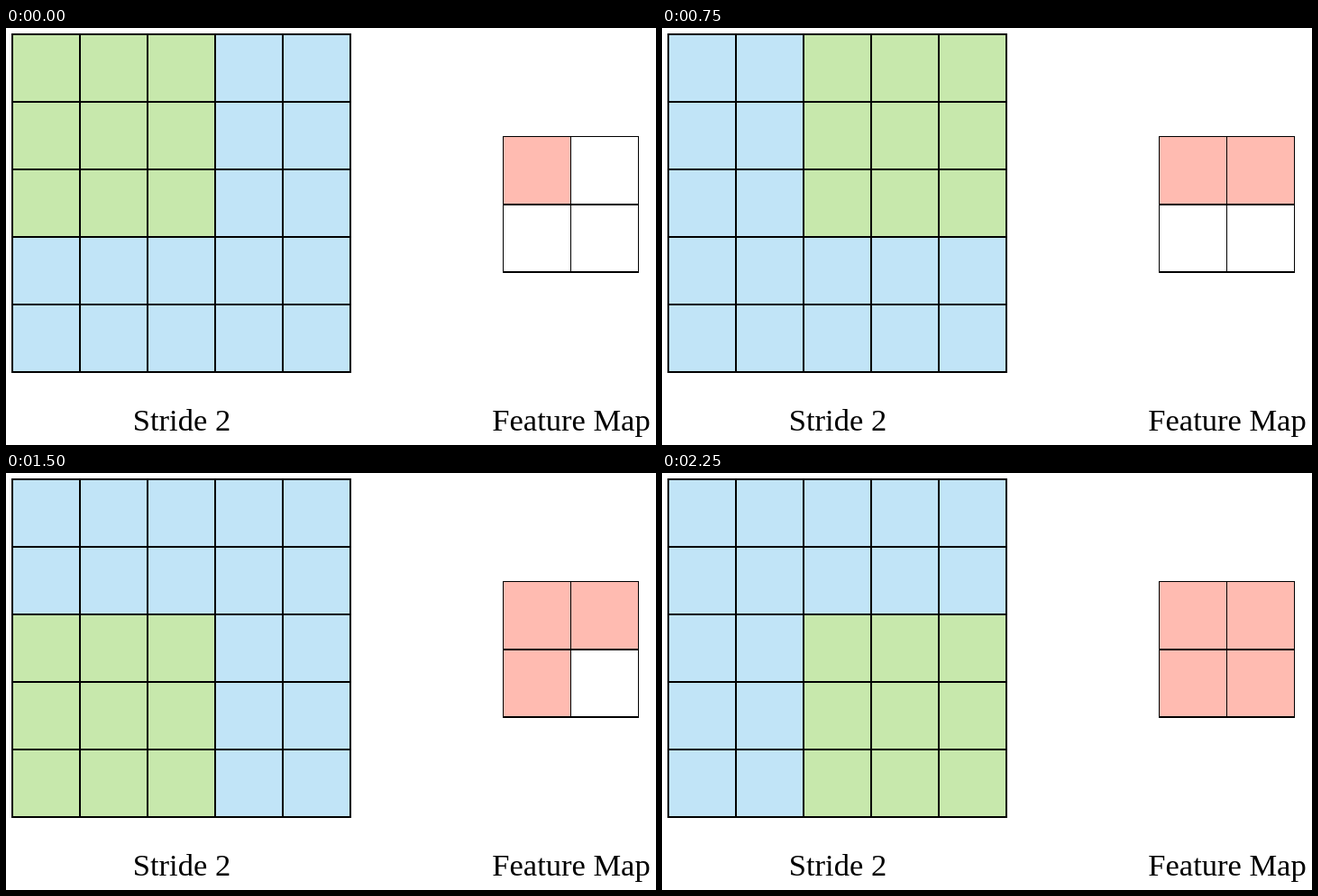
Animation, 721 px wide and 463 px high, one loop 3000 ms. Source, as an HTML page:

```html
<!DOCTYPE html>
<html lang="en">
<head>
<meta charset="utf-8">
<title>Convolution with stride 2</title>
<style>
  html, body { margin: 0; width: 100%; height: 100%; overflow: hidden; background: #fff; }
  svg { display: block; }
  text { font: 34.5px "Liberation Serif", "Times New Roman", serif; text-anchor: middle; }
</style>
</head>
<body>
<svg width="721" height="463" viewBox="0 0 721 463">
  <rect x="7" y="7" width="375" height="375" fill="#c1e4f7"/>
  <rect id="kernel" width="225" height="225" fill="#c7e8ac"/>
  <g id="features" fill="#ffbbb1"></g>
  <g id="lines" shape-rendering="crispEdges"></g>
  <text x="195" y="447">Stride 2</text>
  <text x="627" y="447">Feature Map</text>
</svg>
<script>
const CELL = 75, STEP_MS = 750, STEPS = 4, STRIDE = 2;
const byId = id => document.getElementById(id);
const kernel = byId("kernel"), features = byId("features"), lines = byId("lines");

function addRect(parent, x, y, width, height) {
  const rect = document.createElementNS("http://www.w3.org/2000/svg", "rect");
  Object.entries({ x, y, width, height }).forEach(([k, v]) => rect.setAttribute(k, v));
  return parent.appendChild(rect);
}

const column = step => step % 2;
const row = step => Math.floor(step / 2);

const cells = Array.from({ length: STEPS }, (_, i) =>
  addRect(features, 551.5 + column(i) * CELL, 120.5 + row(i) * CELL, CELL, CELL));

// Input grid: 2px rules
for (let i = 0; i <= 5; i++) {
  addRect(lines, 6 + i * CELL, 6, 2, 377);
  addRect(lines, 6, 6 + i * CELL, 377, 2);
}
// Feature map: hairlines, with heavier rules below the top edge
for (let i = 0; i <= 2; i++) {
  addRect(lines, 551 + i * CELL, 120, 1, 152);
  addRect(lines, 551, 120 + i * CELL, 151, i ? 2 : 1);
}

function draw() {
  const step = Math.floor(performance.now() / STEP_MS) % STEPS;
  kernel.setAttribute("x", 7 + column(step) * STRIDE * CELL);
  kernel.setAttribute("y", 7 + row(step) * STRIDE * CELL);
  cells.forEach((cell, i) => cell.setAttribute("visibility", i <= step ? "visible" : "hidden"));
  requestAnimationFrame(draw);
}
draw();
</script>
</body>
</html>
```
